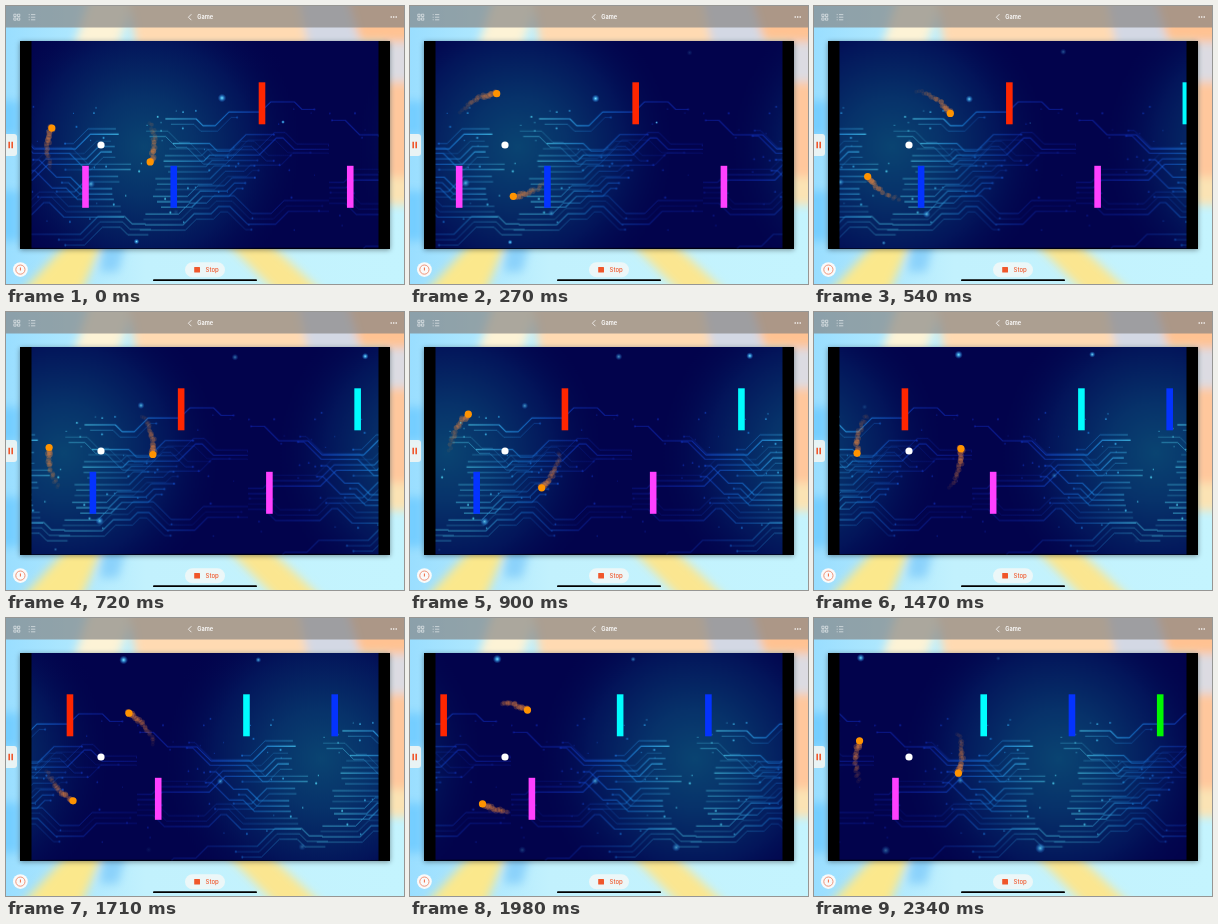
An HTML page with a canvas for the animation above (2.4 s loop, 398 px wide and 278 px high).

```html
<!DOCTYPE html>
<html lang="en">
<head>
<meta charset="utf-8">
<title>Game</title>
<style>
  html, body { margin: 0; width: 100%; height: 100%; overflow: hidden; }
  body {
    position: relative;
    font-family: Inter, Roboto, sans-serif;
    background: linear-gradient(90deg, #9adeff, #c2f1fd 35%, #c4f4fe);
  }
  canvas, svg, .label { position: absolute; left: 0; top: 0; }
  .screen {
    position: absolute; left: 14px; top: 35px; width: 370px; height: 207.5px;
    background: #000; box-shadow: 0 1px 5px #0006;
  }
  .label { line-height: 8px; white-space: nowrap; }
  .title { left: 191.3px; top: 7px; font-size: 5.6px; font-weight: 600; color: #fff; }
  .stop { left: 199.6px; top: 260px; font-size: 6px; font-weight: 500; color: #f0572b; }
</style>
</head>
<body>
<svg width="398" height="278" viewBox="0 0 398 278">
  <filter id="soft" x="-20%" y="-20%" width="140%" height="140%"><feGaussianBlur stdDeviation="5"/></filter>
  <g filter="url(#soft)">
    <path d="M-10 95h24v35h-24zM-10 185h24v50h-24z" fill="#74ceff"/>
    <path d="M85-12h45l-18 52H68z" fill="#fdf3d6"/>
    <path d="M122-12h175l10 52H130z" fill="#ffdab2"/>
    <path d="M292-12h50l12 52h-52z" fill="#d3d8e4"/>
    <path d="M340-12h70v48h-56z" fill="#ffc292"/>
    <path d="M380 36h30v40h-30z" fill="#dcdbe2"/>
    <path d="M380 76h30v95h-30z" fill="#ffc79c"/>
    <path d="M380 171h30v28h-30z" fill="#fbe3b4"/>
    <path d="M62 236h34l-22 54H12z" fill="#fbe88c"/>
    <path d="M96 236h24l-8 30h-18z" fill="#8bd2fb"/>
    <path d="M220 236h42l58 54h-46z" fill="#fbe690"/>
  </g>
</svg>
<div class="screen"></div>
<canvas id="game"></canvas>
<svg width="398" height="278" viewBox="0 0 398 278" fill="none">
  <rect width="398" height="21.5" fill="#858382" fill-opacity=".68"/>
  <g stroke="#fff" stroke-opacity=".75" stroke-width=".7">
    <path d="M7.8 8.2h2.3v2.3h-2.3zM11.5 8.2h2.3v2.3h-2.3zM7.8 11.9h2.3v2.3h-2.3zM11.5 11.9h2.3v2.3h-2.3z"/>
    <path d="M22.7 8.6h1M22.7 11.2h1M22.7 13.8h1M25 8.6h4.3M25 11.2h4.3M25 13.8h4.3"/>
    <path d="M185.4 8.2l-3 3 3 3" stroke-width="1"/>
  </g>
  <g fill="#fff"><circle cx="385.2" cy="11" r=".8"/><circle cx="387.7" cy="11" r=".8"/><circle cx="390.2" cy="11" r=".8"/></g>
  <path d="M0 128h8a3 3 0 0 1 3 3v16a3 3 0 0 1-3 3H0z" fill="#f4f6f3" fill-opacity=".88"/>
  <path d="M2.4 135.7h1.6v6.6h-1.6zM5.4 135.7h1.6v6.6h-1.6z" fill="#f0572b"/>
  <circle cx="14.4" cy="263.6" r="7.4" fill="#fafafa"/>
  <circle cx="14.4" cy="263.6" r="4.6" stroke="#ec8a6c" stroke-width=".9"/>
  <path d="M14.4 264.5v-3" stroke="#f0572b" stroke-width=".9"/>
  <rect x="179" y="256.3" width="40" height="15" rx="7.5" fill="#f4f8f7" fill-opacity=".85"/>
  <rect x="188.2" y="261" width="5.8" height="5.6" rx=".5" fill="#f0572b"/>
  <rect x="147" y="273.3" width="104" height="1.8" rx=".9" fill="#000"/>
</svg>
<div class="label title">Game</div>
<div class="label stop">Stop</div>
<script>
const W = 398, H = 278, LOOP = 2400, STEP = 30;
const VIEW = { x: 25.5, y: 35, w: 347, h: 207.5 };
const TILE = 369, SPEED = 0.1123, SPIN = 0.229;
const HUB = { x: 95, y: 139, r: 52 };
const TURNS = [1081, 1860];
const TRAIL = 190;

const RED = '#ff2600', PINK = '#ff40ff', BLUE = '#0433ff', CYAN = '#00fdff', GREEN = '#00f900';
const UP = 76.3, LOW = 159.8;
const BARS = [[PINK, LOW], [BLUE, LOW], [RED, UP], [PINK, LOW], [CYAN, UP], [BLUE, UP], [GREEN, UP]];

// x, y, drift y per second, speed, radius, peak time, half life, strength
const STARS = [
  [216, 92, 2, .1125, 1.8, 0, 1700, 1],
  [310, 47.6, -3.3, .1125, 1.9, 1850, 1800, 1],
  [437, 46, -2.4, .108, 1.5, 950, 1700, 1],
  [277, 116, 2, .1125, .8, 0, 700, 1],
  [130.5, 235.5, 2.6, .1125, 1.2, 0, 1000, 1],
  [85, 178, -3.5, .1085, 1.9, 200, 900, .7],
  [170, 206, 4, .106, 1.9, 850, 1000, .8],
  [486, 225, 2.2, .111, 2.2, 2400, 1000, .8],
  [399, 165, -1, .108, 1.7, 2000, 1000, .6],
  [335, 230, 1, .1125, 2, 2400, 800, .4]
];

function random(seed) {
  return () => (seed = (seed * 16807) % 2147483647) / 2147483647;
}

const dpr = window.devicePixelRatio || 1;

function setup(canvas, w, h) {
  canvas.width = Math.round(w * dpr);
  canvas.height = Math.round(h * dpr);
  canvas.style.width = w + 'px';
  canvas.style.height = h + 'px';
  const c = canvas.getContext('2d');
  c.scale(dpr, dpr);
  return c;
}

function dot(c, x, y, r, color) {
  c.fillStyle = color;
  c.beginPath();
  c.arc(x, y, r, 0, Math.PI * 2);
  c.fill();
}

function glow(c, x, y, r, stops) {
  const g = c.createRadialGradient(x, y, 0, x, y, r);
  stops.forEach(([at, color]) => g.addColorStop(at, color));
  c.fillStyle = g;
  c.fillRect(x - r, y - r, r * 2, r * 2);
}

// Parallel traces with 45 degree jogs, running outwards from the middle
function drawTraces(c, ink) {
  const rnd = random(4127), mid = TILE / 2, gap = 5.4;
  c.strokeStyle = ink;
  c.lineJoin = 'round';
  for (const side of [-1, 1]) {
    for (let base = side < 0 ? 88 : 78; base < 188;) {
      const count = 2 + Math.floor(rnd() * 3);
      const start = rnd() * 40 - 12;
      const bends = Array.from({ length: 4 }, () => [
        10 + rnd() * 42,
        (rnd() < .5 ? -1 : 1) * (6 + rnd() * 12)
      ]);
      for (let k = 0; k < count; k++) {
        let x = start + rnd() * 10, y = base + k * gap, edge = start + 8;
        const limit = 70 + rnd() * 130;
        c.globalAlpha = .45 + .55 * rnd();
        c.lineWidth = rnd() < .35 ? 1.1 : .65;
        c.beginPath();
        c.moveTo(mid + side * x, y);
        for (const [run, jog] of bends) {
          edge += run;
          const turn = edge - Math.sign(jog) * k * gap * .41;
          if (turn > limit) break;
          x = Math.max(x, turn);
          c.lineTo(mid + side * x, y);
          x += Math.abs(jog);
          y += jog;
          edge += Math.abs(jog);
          c.lineTo(mid + side * x, y);
        }
        x = Math.min(mid, Math.max(x + 6, limit));
        c.lineTo(mid + side * x, y);
        c.stroke();
        if (x < mid) dot(c, mid + side * x, y, 1.1, ink);
      }
      base += count * gap + 1.5;
    }
  }
  c.globalAlpha = .9;
  for (let i = 0; i < 70; i++) {
    dot(c, rnd() * TILE, 65 + rnd() * 130, .5 + rnd() * .6, ink);
  }
}

function makeTile() {
  const canvas = document.createElement('canvas');
  const c = setup(canvas, TILE, VIEW.h);
  c.fillStyle = '#02034c';
  c.fillRect(0, 0, TILE, VIEW.h);
  glow(c, TILE / 2, 106, 165, [[0, '#0a4472'], [.3, '#07326a'], [.65, '#03155a'], [1, '#02034c00']]);
  const ink = c.createLinearGradient(0, 0, TILE, 0);
  [[0, '#1228c080'], [.16, '#1238ccb0'], [.32, '#1a80dcd8'], [.46, '#4fd4f4'], [.56, '#4fd4f4'],
   [.7, '#1a80dcd8'], [.86, '#1238ccb0'], [1, '#1228c080']]
    .forEach(([at, color]) => ink.addColorStop(at, color));
  drawTraces(c, ink);
  return canvas;
}

function spin(t) {
  const [a, b] = TURNS;
  const run = t < a ? t : t < b ? 2 * a - t : t + 2 * (a - b);
  return (-161 + SPIN * run) * Math.PI / 180;
}

function orbit(t, half, r) {
  const a = spin(t) + half * Math.PI;
  return [HUB.x + Math.cos(a) * r, HUB.y + Math.sin(a) * r];
}

function drawStars(c, t) {
  for (const [x, y, vy, vx, r, peak, life, power] of STARS) {
    const fade = 1 - Math.abs(t - peak) / life;
    if (fade <= 0) continue;
    const px = x - vx * t, py = y + vy * t / 1000, size = r * (.6 + .4 * fade);
    c.globalAlpha = power * Math.min(1, fade * 1.3);
    glow(c, px, py, size * 2.4, [[0, '#7fe4ff'], [.3, '#46b8f5d0'], [1, '#1c6ad000']]);
  }
  c.globalAlpha = 1;
}

function drawTrail(c, t, half) {
  const rnd = random(97 + half * 31);
  for (let age = TRAIL; age > 0; age -= 9) {
    const left = 1 - age / TRAIL;
    const [x, y] = orbit(t - age, half, HUB.r + age * .015);
    c.globalAlpha = .06 + .28 * left;
    dot(c, x + (rnd() - .5) * 3, y + (rnd() - .5) * 3, 2 + left, '#e8843c');
  }
  c.globalAlpha = 1;
}

const ctx = setup(document.getElementById('game'), W, H);
const tile = makeTile();

function draw(t) {
  ctx.clearRect(0, 0, W, H);
  ctx.save();
  ctx.beginPath();
  ctx.rect(VIEW.x, VIEW.y, VIEW.w, VIEW.h);
  ctx.clip();
  const left = -46 - SPEED * t;
  for (let i = 0; i < 3; i++) ctx.drawImage(tile, left + i * TILE, VIEW.y, TILE, VIEW.h);
  drawStars(ctx, t);
  for (const half of [0, 1]) drawTrail(ctx, t, half);
  BARS.forEach(([color, y], i) => {
    ctx.fillStyle = color;
    ctx.fillRect(76.2 + i * 88.25 - SPEED * t, y, 6.6, 42);
  });
  dot(ctx, HUB.x, HUB.y, 3.6, '#fff');
  for (const half of [0, 1]) dot(ctx, ...orbit(t, half, HUB.r), 3.6, '#ff9300');
  ctx.restore();
}

function frame() {
  const t = performance.now() % LOOP;
  draw(Math.min(Math.floor(t / STEP) * STEP, LOOP - 2 * STEP));
  requestAnimationFrame(frame);
}
frame();
</script>
</body>
</html>
```
